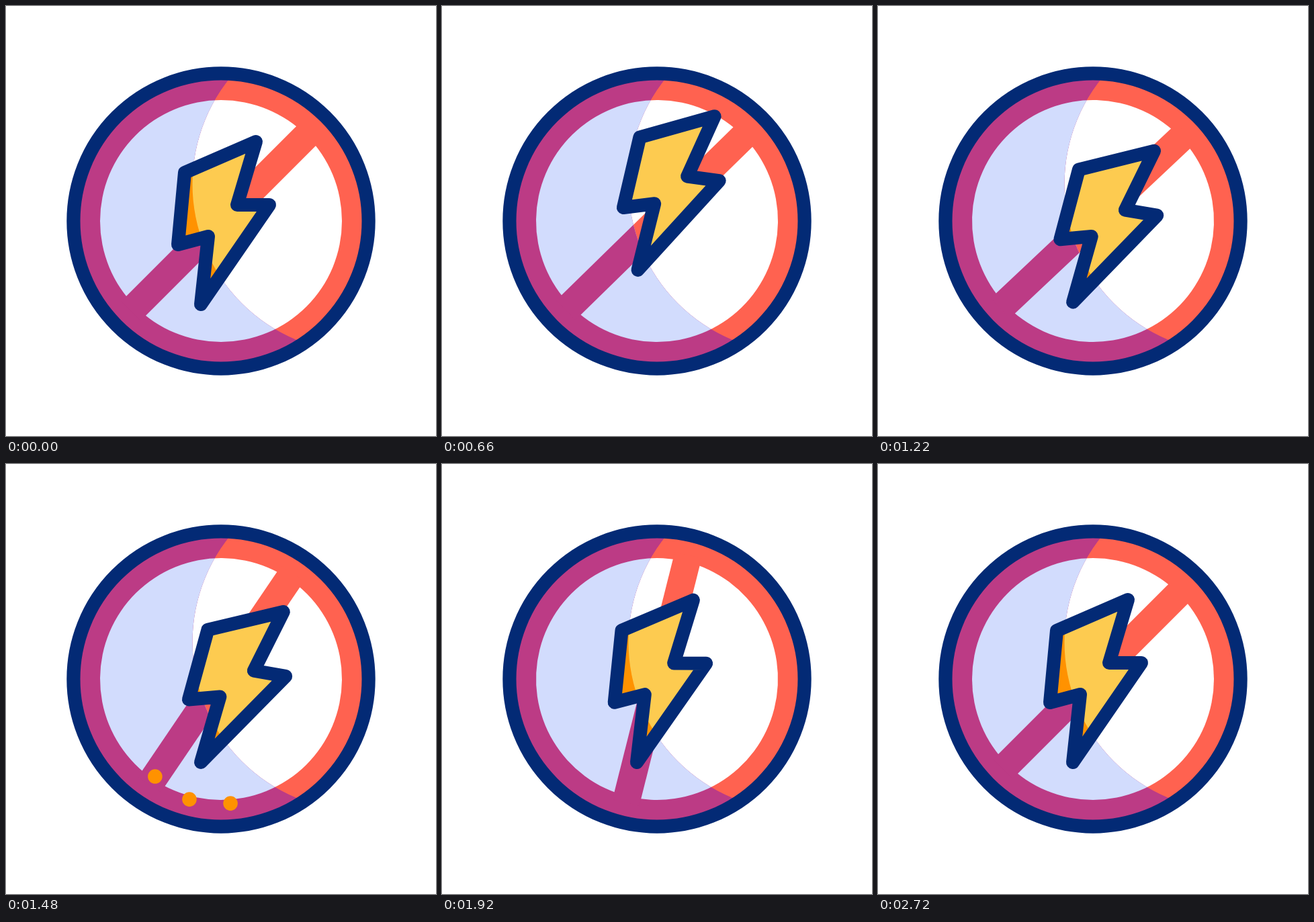
Animation, 640 px wide and 640 px high, one loop 3020 ms. Source, as an HTML page with a canvas:

```html
<!DOCTYPE html>
<html lang="en">
<head>
<meta charset="utf-8">
<title>No lightning sign</title>
<style>
  html, body { margin: 0; width: 100%; height: 100%; overflow: hidden; background: #fff; }
  canvas { display: block; width: 100%; height: 100%; }
</style>
</head>
<body>
<canvas id="stage" width="640" height="640"></canvas>
<script>
const ctx = document.getElementById('stage').getContext('2d');
const LOOP = 3020;
const NAVY = '#032a75';
const LIGHT = { face: '#ffffff', sign: '#ff6250', bolt: '#fdcb50' };
const SHADE = { face: '#d2dcfd', sign: '#bc3b85', bolt: '#ff9200' };

// Bolt corners relative to its lower tip, which is also its pivot.
const TIP = { x: 290, y: 444 };
const bolt = new Path2D('M82-242L-24-196L-34-89L11-101L0 0L102-148L54-148Z');

// The lit area is a large circle; everything outside it is shaded.
const shadeArea = new Path2D('M0 0H640V640H0Z');
shadeArea.arc(528.5, 265, 251, 0, 2 * Math.PI);

// Keyframes as [time in ms, value].
const signAngle = [[0, 0], [380, -2], [920, 3], [1385, 0], [2370, -370], [2700, -360]];
const boltTilt = [[0, 0], [380, 7.1], [600, 8], [920, 6], [1300, 10], [1480, 10], [1985, 0]];
const boltRise = [[0, 0], [380, 46], [600, 52], [920, 37], [1300, 0]];
const sparkTravel = [[1290, 0], [1480, 1], [1760, 1.3]];
const sparkSize = [[1290, 0], [1400, 1], [1510, 1], [1760, 0]];
const sparkOffsets = [[-68, 21], [-17, 55], [44, 61]];

// Smooth interpolation that never overshoots its keys.
function valueAt(keys, t) {
  const last = keys.length - 1;
  if (t <= keys[0][0]) return keys[0][1];
  if (t >= keys[last][0]) return keys[last][1];
  const i = keys.findIndex(key => key[0] > t) - 1;
  const slope = k => (keys[k + 1][1] - keys[k][1]) / (keys[k + 1][0] - keys[k][0]);
  const tangent = k => {
    if (k === 0 || k === last) return 0;
    const a = slope(k - 1), b = slope(k);
    return a * b > 0 ? 2 * a * b / (a + b) : 0;
  };
  const span = keys[i + 1][0] - keys[i][0];
  const u = (t - keys[i][0]) / span, v = 1 - u;
  return keys[i][1] * v * v * (1 + 2 * u) + keys[i + 1][1] * u * u * (3 - 2 * u)
    + span * u * v * (tangent(i) * v - tangent(i + 1) * u);
}

function place(x, y, degrees, paint) {
  ctx.save();
  ctx.translate(x, y);
  ctx.rotate(degrees * Math.PI / 180);
  paint();
  ctx.restore();
}

function disc(x, y, radius, color) {
  ctx.beginPath();
  ctx.arc(x, y, radius, 0, 2 * Math.PI);
  ctx.fillStyle = color;
  ctx.fill();
}

function litAndShaded(paint) {
  paint(LIGHT);
  ctx.save();
  ctx.clip(shadeArea, 'evenodd');
  paint(SHADE);
  ctx.restore();
}

function drawSign(t) {
  litAndShaded(colors => place(320, 320, valueAt(signAngle, t) - 45, () => {
    disc(0, 0, 215, colors.sign);
    disc(0, 0, 180, colors.face);
    ctx.fillStyle = colors.sign;
    ctx.fillRect(-190, -20.5, 380, 41);
  }));
  ctx.beginPath();
  ctx.arc(320, 320, 219.6, 0, 2 * Math.PI);
  ctx.lineWidth = 20.2;
  ctx.strokeStyle = NAVY;
  ctx.stroke();
}

function drawSparks(t) {
  const travel = valueAt(sparkTravel, t);
  const radius = 10.8 * valueAt(sparkSize, t);
  if (radius <= 0) return;
  for (const [x, y] of sparkOffsets) {
    disc(TIP.x + x * travel, TIP.y + y * travel, radius, SHADE.bolt);
  }
}

function drawBolt(t) {
  const rise = valueAt(boltRise, t);
  const pose = paint => place(TIP.x + rise * 0.03, TIP.y - rise, valueAt(boltTilt, t), paint);
  litAndShaded(colors => pose(() => {
    ctx.fillStyle = colors.bolt;
    ctx.fill(bolt);
  }));
  pose(() => {
    ctx.lineWidth = 20;
    ctx.lineJoin = 'round';
    ctx.strokeStyle = NAVY;
    ctx.stroke(bolt);
  });
}

function frame() {
  const t = performance.now() % LOOP;
  ctx.fillStyle = '#fff';
  ctx.fillRect(0, 0, 640, 640);
  drawSign(t);
  drawSparks(t);
  drawBolt(t);
  requestAnimationFrame(frame);
}
frame();
</script>
</body>
</html>
```
